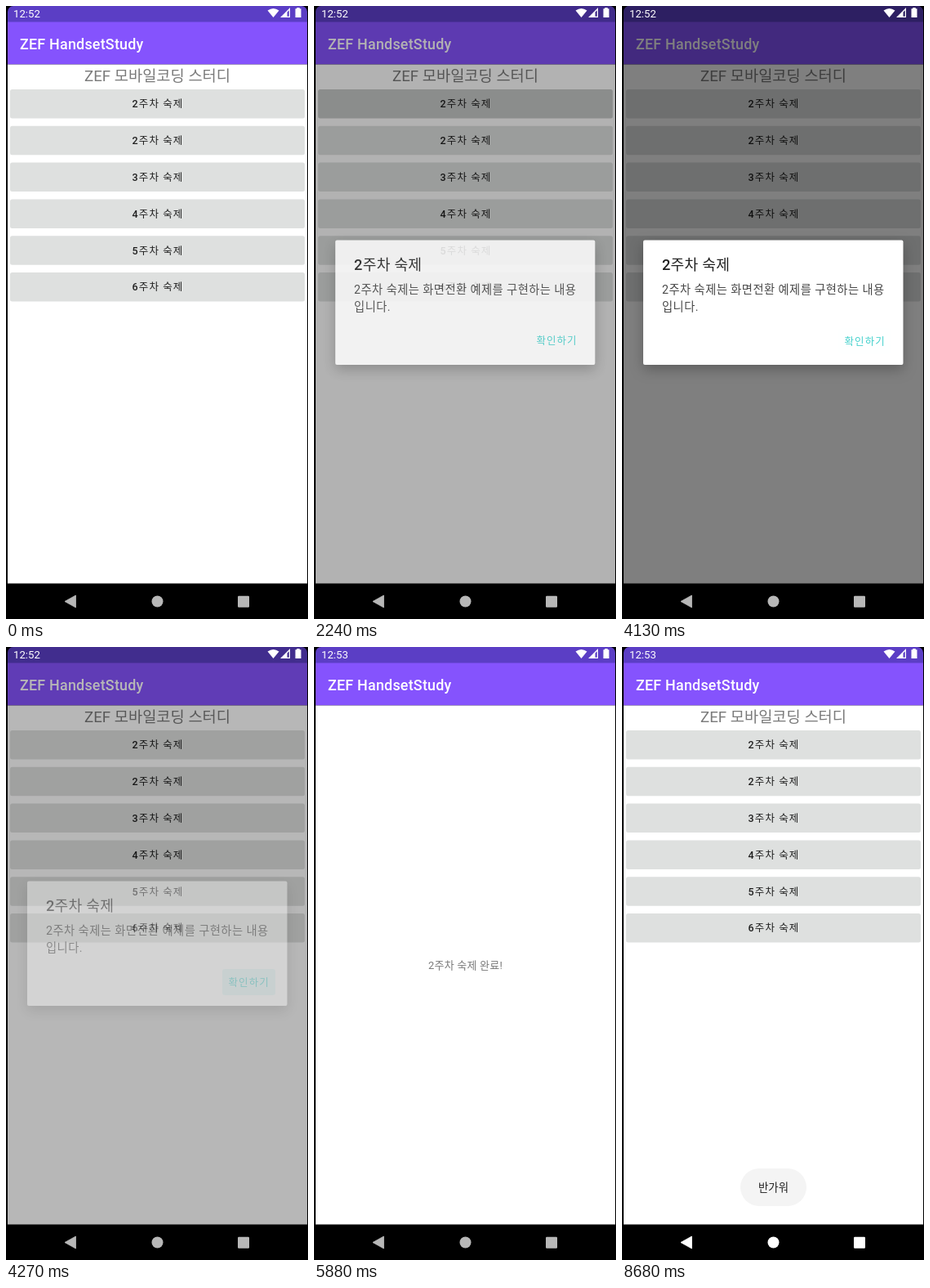
An HTML page for the animation above (8960 ms loop, 370 by 750 pixels).

```html
<!DOCTYPE html>
<html lang="ko">
<head>
<meta charset="utf-8">
<style>
  html, body { margin: 0; width: 100%; height: 100%; overflow: hidden; background: #000; }
  svg { display: block; font-family: Roboto, "Noto Sans CJK KR", "Noto Sans CJK", sans-serif; }
  .mid { text-anchor: middle; }
  .bold { font-weight: 500; }
  .bar { font-size: 17.9px; font-weight: 500; letter-spacing: .22px; fill: #fff; }
  .heading { font-size: 18.7px; fill: #7a7a7a; }
  .button { font-size: 12.5px; letter-spacing: 1.1px; fill: #1f1f1f; }
  .note { font-size: 13px; letter-spacing: .22px; fill: #7a7a7a; }
  .title { font-size: 18.2px; letter-spacing: .25px; fill: #222; }
  .body { font-size: 14.29px; letter-spacing: .43px; fill: #484848; }
  .action { font-size: 12.5px; letter-spacing: 1.1px; fill: #45d1cd; }
  .toast { font-size: 13.4px; fill: #222; }
  .clock { font-size: 13.2px; fill: #fff; }
  #card { filter: drop-shadow(0 6px 8px rgba(0, 0, 0, .25)); }
</style>
</head>
<body>
<svg id="stage" width="370" height="750" viewBox="0 0 370 750"></svg>
<script>
const LOOP = 8960, CX = 185.5, CY = 375;

const week = n => `<tspan class="bold">${n}</tspan>주차 숙제`;

const chrome = content => `
  <rect width="370" height="750"/>
  <rect width="370" height="20" fill="#5b3ec5"/>
  <rect y="19.5" width="370" height="52" fill="#8553fd"/>
  <rect y="71.5" width="370" height="635" fill="#fff"/>
  <text class="bar" x="17" y="53">ZEF HandsetStudy</text>${content}`;

const buttons = [2, 2, 3, 4, 5, 6].map((n, i) => {
  const y = 102 + 44.8 * i;
  return `<rect x="5" y="${y}" width="361" height="35.5" rx="2.5" fill="#dee0df"/>
    ${i ? '' : '<g clip-path="url(#first)"><circle id="press" cx="185" cy="120"/></g>'}
    <text class="button mid" x="186" y="${y + 22.3}">${week(n)}</text>`;
}).join('');

document.getElementById('stage').innerHTML = `
  <defs>
    <clipPath id="screen"><rect x="2" width="367" height="750" rx="7"/></clipPath>
    <clipPath id="first"><rect x="5" y="102" width="361" height="35.5" rx="2.5"/></clipPath>
  </defs>
  <rect width="370" height="750"/>
  <g clip-path="url(#screen)">
    <g id="list">${chrome(`
      <text class="heading mid" x="185.5" y="92">ZEF 모바일코딩 스터디</text>${buttons}`)}</g>
    <g id="done">${chrome('<text class="note mid" x="185.5" y="394">2주차 숙제 완료!</text>')}</g>
    <rect id="dim" width="370" height="750"/>
    <g id="dialog">
      <rect id="card" x="26" y="286.5" width="318.5" height="152.5" rx="2" fill="#fff"/>
      <rect id="tap" x="265" y="394" width="65" height="32" rx="3" fill="#45d1cd"/>
      <text class="title" x="49" y="323">${week(2)}</text>
      <text class="body" x="49" y="352">2주차 숙제는 화면전환 예제를 구현하는 내용</text>
      <text class="body" x="49" y="373">입니다.</text>
      <text class="action" x="272.5" y="414.5">확인하기</text>
    </g>
    <g id="toast">
      <rect x="145" y="638" width="81" height="46" rx="23" fill="#f4f4f4"/>
      <text class="toast mid" x="185.5" y="666">반가워</text>
    </g>
  </g>
  <text class="clock" id="clock" x="9" y="13.7"></text>
  <g fill="#fff">
    <path d="M320.5 5.5Q327.5 .5 334.5 5.5L327.5 14Z"/>
    <path d="M336 14L348 2V14ZM344.5 7.5V12.8H346.8V5.2Z" fill-rule="evenodd"/>
    <path d="M356.3 2H359.7V3.3H361.5V14H354.5V3.3H356.3Z"/>
  </g>
  <circle id="backTap" cx="78.5" cy="728.5" fill="#fff"/>
  <g id="nav" fill="#fff">
    <path d="M72 728.5L85.5 721V736Z" stroke="#fff" stroke-width=".8" stroke-linejoin="round"/>
    <circle cx="185.5" cy="728.5" r="7"/>
    <rect x="284" y="721.7" width="14" height="14" rx="1.2"/>
  </g>`;

const el = id => document.getElementById(id);
const ramp = (t, from, to) => Math.min(1, Math.max(0, (t - from) / (to - from)));
const decel = (x, power) => 1 - (1 - x) ** power;
const fade = (id, value) => el(id).setAttribute('opacity', value);
const scale = (id, s, cy = CY) =>
  el(id).setAttribute('transform', `translate(${CX} ${cy}) scale(${s}) translate(${-CX} ${-cy})`);

const bezier = (u, a, b, c, d) =>
  a * (1 - u) ** 3 + 3 * b * u * (1 - u) ** 2 + 3 * c * u * u * (1 - u) + d * u ** 3;

// Fast start, very long tail: two joined Bezier curves.
function emphasized(x) {
  const [xs, ys] = x < 1 / 6
    ? [[0, .05, .133333, 1 / 6], [0, 0, .06, .4]]
    : [[1 / 6, .208333, .25, 1], [.4, .82, 1, 1]];
  let low = 0, high = 1;
  for (let i = 0; i < 24; i++) {
    const u = (low + high) / 2;
    if (bezier(u, ...xs) < x) low = u; else high = u;
  }
  return bezier(low, ...ys);
}

function draw(t) {
  el('clock').textContent = t < 5250 ? '12:52' : '12:53';

  el('press').setAttribute('r', 190 * decel(ramp(t, 1930, 2150), 2));
  fade('press', .1 * (1 - ramp(t, 2260, 2430)));

  fade('dim', .5 * (ramp(t, 2120, 2320) - ramp(t, 4180, 4390)));
  fade('dialog', ramp(t, 2140, 2260) - ramp(t, 4180, 4330));
  scale('dialog', .9 + .1 * decel(ramp(t, 2120, 2320), 5), 362.5);
  fade('tap', .15 * ramp(t, 4130, 4200));

  const open = emphasized(ramp(t, 4365, 4765));
  const close = emphasized(ramp(t, 8120, 8520));
  scale('list', 1 + .05 * (open - close));
  scale('done', .85 + .15 * (open - close));
  fade('done', ramp(t, 4411, 4461) - ramp(t, 8155, 8205));

  fade('toast', decel(ramp(t, 8350, 8620), 2));

  el('backTap').setAttribute('r', 8 + 18 * decel(ramp(t, 7890, 8040), 2));
  fade('backTap', .2 * (ramp(t, 7890, 7950) - ramp(t, 8060, 8260)));
  fade('nav', .72 + .28 * ramp(t, 7900, 8000));
}

const start = performance.now();
function tick() {
  draw((performance.now() - start) % LOOP);
  requestAnimationFrame(tick);
}
tick();
</script>
</body>
</html>
```
